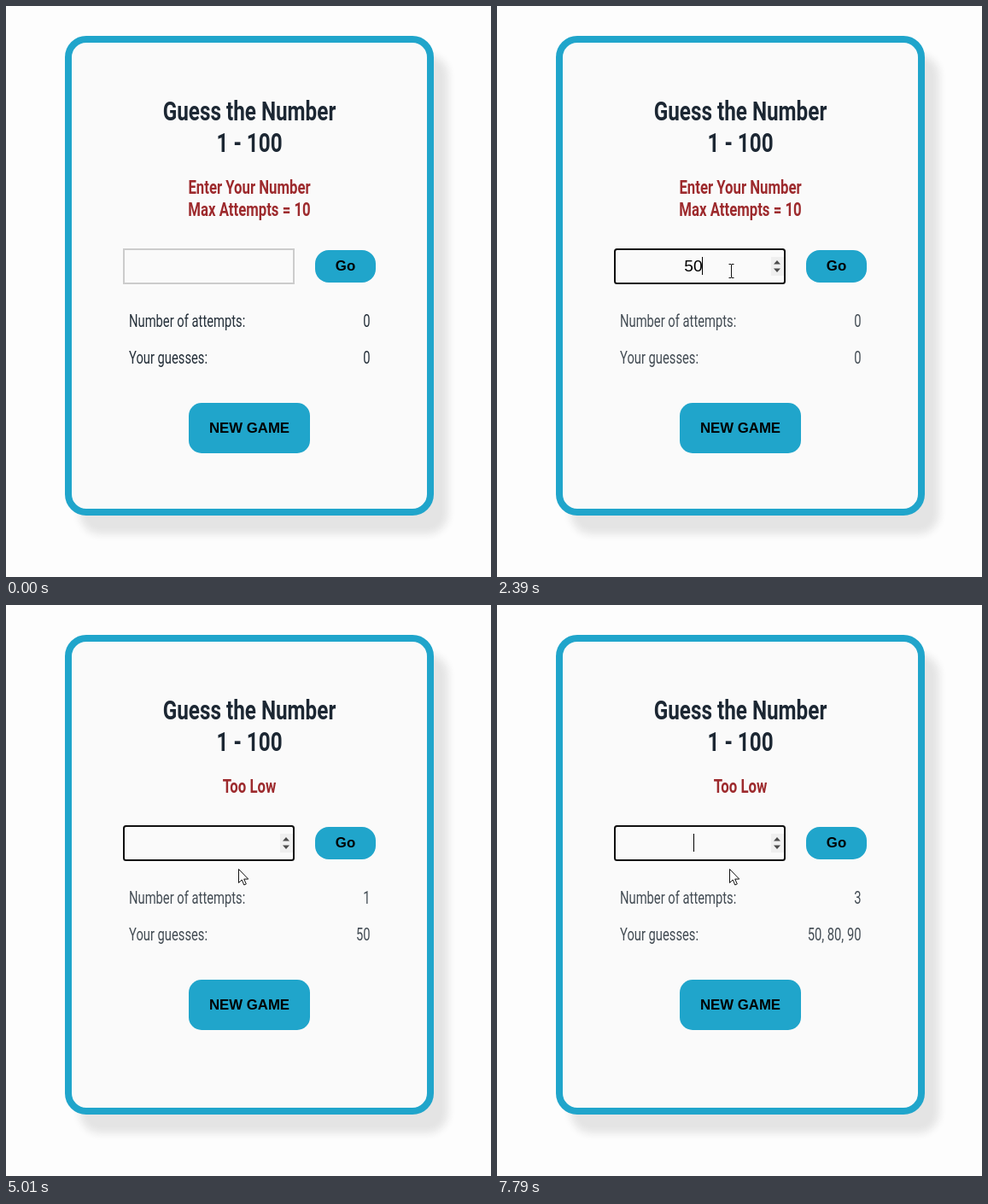
Recreate the animation shown at these times as an HTML page. Size 568 by 669 pixels, loop 8 s.

```html
<!DOCTYPE html>
<html lang="en">
<head>
<meta charset="utf-8">
<title>Guess the Number</title>
<style>
  html, body { margin: 0; width: 100%; height: 100%; overflow: hidden; background: #fdfdfd; }
  .card {
    position: absolute; left: 69px; top: 35px; width: 432px; height: 562px;
    box-sizing: border-box; border: 8px solid #20a5cb; border-radius: 25px;
    background: #fafafa; box-shadow: 17px 22px 10px #e4e4e4;
  }
  svg { position: absolute; left: 0; top: 0; display: block; }
  text { font-family: Roboto, "Liberation Sans", sans-serif; }
  .title { font-size: 31.5px; font-weight: 700; fill: #1c2733; }
  .hint { font-size: 21.5px; font-weight: 700; fill: #9d2a2d; }
  .row { font-size: 20px; fill: #25303a; }
  .focus .row { fill: #434c54; }
  .button, .value { font-family: "Liberation Sans", Arial, sans-serif; }
  .button { font-size: 16.8px; font-weight: 700; }
  .value { font-size: 19.2px; }
  .mid { text-anchor: middle; }
  .end { text-anchor: end; }
  .box { fill: #fafafa; stroke: #ccc; stroke-width: 2; }
  .focus .box { stroke: #101010; }
</style>
</head>
<body>
<div class="card"></div>
<svg id="stage" width="568" height="669" viewBox="0 0 568 669">
  <g id="heading"></g>
  <g id="form">
    <rect class="box" id="box" x="138" y="285" width="199" height="40"/>
    <g id="spinner">
      <rect x="321" y="294" width="15" height="22" fill="#efefef"/>
      <path d="M324 302.5l4-4.5 4 4.5zM324 307.5l4 4.5 4-4.5z" fill="#4c4c4c"/>
    </g>
    <text class="value mid" id="value" x="230" y="311"></text>
    <rect id="caret" y="294" width="1" height="21"/>
    <rect x="362" y="286" width="71" height="38" rx="16" fill="#20a5cb"/>
    <text class="button mid" x="397.5" y="310">Go</text>
    <rect x="214" y="465" width="142" height="59" rx="15" fill="#20a5cb"/>
    <text class="button mid" x="285" y="500">NEW GAME</text>
  </g>
  <path id="arrow" d="M.5.5v16l3.7-3.5 2.6 6 2.5-1.1-2.6-5.8h5z" fill="#fff" stroke="#111"/>
  <path id="beam" d="M-3-7.5h2.5l.5.5.5-.5h2.5M0-7v15M-3 8.5h2.5l.5-.5.5.5h2.5" fill="none" stroke="#111"/>
</svg>
<script>
const LOOP = 8000;
const $ = id => document.getElementById(id);

// Condensed face: one horizontal ratio per weight.
const CONDENSE = { title: .77, hint: .78, row: .738 };

function label(parent, style, align, x, y, str) {
  const el = document.createElementNS("http://www.w3.org/2000/svg", "text");
  el.setAttribute("class", style + " " + align);
  el.setAttribute("transform", `translate(${x} ${y}) scale(${CONDENSE[style]} 1)`);
  el.textContent = str;
  parent.append(el);
  return el;
}

const heading = $("heading"), form = $("form");
label(heading, "title", "mid", 285, 134, "Guess the Number");
label(heading, "title", "mid", 285, 171, "1 - 100");
const hint = label(heading, "hint", "mid", 285, 220, "");
const hint2 = label(heading, "hint", "mid", 285, 246, "Max Attempts = 10");
label(form, "row", "", 144, 376, "Number of attempts:");
label(form, "row", "", 144, 419, "Your guesses:");
const attempts = label(form, "row", "end", 426.5, 376, "");
const guesses = label(form, "row", "end", 426.5, 419, "");

// [time, typed value, caret shown]
const typing = [
  [0, "", 0], [1270, "", 1], [1720, "", 0], [2250, "", 1], [2320, "5", 1], [2390, "50", 1],
  [2650, "", 1], [2920, "", 0], [3420, "", 1], [3950, "", 0], [4480, "", 1], [5010, "", 0],
  [5470, "8", 1], [5540, "80", 1], [5740, "", 1], [6070, "", 0],
  [6600, "9", 1], [6730, "90", 1], [6930, "", 1], [7260, "", 0], [7790, "", 1]
];
// [submit time, guess]
const submits = [[2650, 50], [5740, 80], [6930, 90]];

const show = (el, on) => el.setAttribute("visibility", on ? "visible" : "hidden");

function pointer(t) {
  const step = Math.min(9, Math.floor((t - 180) / 68.8));
  const p = 1 - (1 - step / 9) ** 2;
  return [Math.round(531 - 257 * p), Math.round(650 - 340 * p)];
}

function render(t) {
  const [, typed, caretOn] = typing.findLast(s => s[0] <= t);
  const made = submits.filter(s => s[0] <= t).map(s => s[1]);
  const played = made.length > 0;
  const focused = t >= 1200;

  $("stage").classList.toggle("focus", focused);
  $("box").setAttribute("rx", focused ? 2.5 : 0);
  form.setAttribute("transform", `translate(0 ${played ? -26 : 0})`);
  hint.textContent = played ? "Too Low" : "Enter Your Number";
  show(hint2, !played);
  attempts.textContent = made.length;
  guesses.textContent = made.join(", ") || "0";

  $("value").textContent = typed;
  $("caret").setAttribute("x", 230 + Math.round(typed.length * 5.2));
  show($("caret"), caretOn);

  const [x, y] = played ? [272, 309] : pointer(t);
  const inside = !played && x < 338 && y < 326;
  show($("spinner"), focused || inside);
  show($("beam"), inside);
  show($("arrow"), t >= 180 && !inside);
  $("beam").setAttribute("transform", `translate(${x + .5} ${y})`);
  $("arrow").setAttribute("transform", `translate(${x} ${y})`);
}

const start = performance.now();
function tick() {
  render((performance.now() - start) % LOOP);
  requestAnimationFrame(tick);
}
tick();
</script>
</body>
</html>
```
